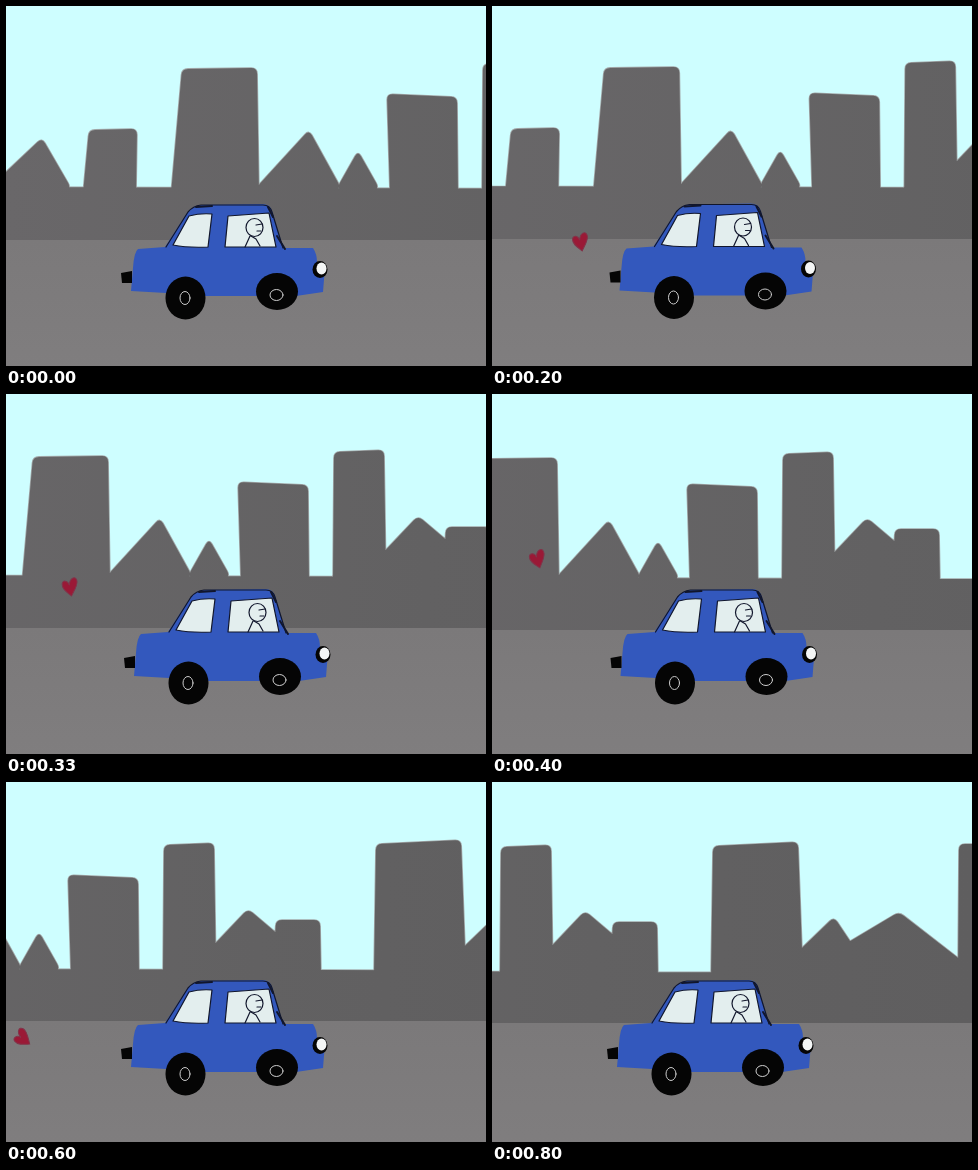
An HTML page that plays this animation: 480 by 360 pixels, repeating every 0.87 s.

```html
<!DOCTYPE html>
<html lang="en">
<head>
<meta charset="utf-8">
<title>Blue car in the city</title>
<style>
  html, body { margin: 0; width: 100%; height: 100%; overflow: hidden; background: #7f7d7e; }
  svg { display: block; width: 480px; height: 360px; }
</style>
</head>
<body>
<svg viewBox="0 0 480 360">
  <defs>
    <linearGradient id="paint" gradientUnits="userSpaceOnUse" x1="0" x2="950" y1="0" y2="0">
      <stop offset="0" stop-color="#696769"/>
      <stop offset=".6" stop-color="#626162"/>
      <stop offset="1" stop-color="#5f5e5f"/>
    </linearGradient>
    <linearGradient id="asphalt" x2="0" y2="1">
      <stop offset="0" stop-color="#7b797a"/>
      <stop offset="1" stop-color="#807e7f"/>
    </linearGradient>
    <path id="heart" d="M0 9C-4 5-9 1-8-4C-7-8-2-7-1-2C0-9 6-11 7-6C8-2 4 3 0 9Z"
      fill="#9a1936" stroke="#82344a"/>
  </defs>

  <rect width="480" height="360" fill="#cefeff"/>

  <g id="city">
    <path id="skyline" fill="url(#paint)" stroke="#a3a8a9" stroke-width="1.6" paint-order="stroke"/>
    <rect x="-9" y="234" width="980" height="140" fill="url(#asphalt)"/>
  </g>

  <g id="hearts"></g>

  <g id="car" stroke-linecap="round" stroke-linejoin="round">
    <path fill="#3358bd" d="M125 285L127 262Q128 246 132 243L159 241L181 207Q186 200 195 199L256 198
      Q264 198 266 205L277 242L307 242Q311 248 311 256L319 261L317 286L290 290L200 290L160 287Z"/>
    <g fill="none" stroke="#11162c" stroke-width="1.2">
      <path d="M160 241L182 206Q187 200 195 199L257 199Q264 199 266 206L277 242"/>
      <path stroke-width="2" d="M190 201L206 200M262 201L267 211M271 230L279 243"/>
      <path fill="#e3eeee" d="M167 239L183 210Q194 207 206 208L202 241Q182 242 167 239Z"/>
      <path fill="#e3eeee" d="M222 210L263 207L270 241L219 241Z"/>
      <ellipse cx="248.500" cy="221.500" rx="8.500" ry="9"/>
      <path d="M250 219L256 218M251 225L255 225M244 230L239 241M245 230L250 233L254 240"/>
    </g>
    <g fill="#050505">
      <path d="M115 267L126 265L126 277L116 277Z"/>
      <ellipse cx="179.500" cy="292" rx="20" ry="21.500"/>
      <ellipse cx="271" cy="285.500" rx="21" ry="18.500"/>
      <ellipse cx="314" cy="263.500" rx="7.500" ry="8.500"/>
    </g>
    <ellipse cx="315.500" cy="262.500" rx="5" ry="6" fill="#f4f6f6"/>
    <g fill="none" stroke="#ccc">
      <ellipse cx="179" cy="292" rx="5" ry="6.500"/>
      <ellipse cx="270.500" cy="289" rx="6.500" ry="5.500"/>
    </g>
  </g>
</svg>
<script>
const LOOP = 870, LAST_STEP = 12;
const byId = id => document.getElementById(id);

// Closed outline through points, each corner softened by r
function softPolygon(points, r = 6) {
  const toward = ([x, y], [u, v]) => {
    const k = r / Math.hypot(u - x, v - y);
    return [x + (u - x) * k, y + (v - y) * k];
  };
  const corners = points.map((p, i) => {
    const before = points.at(i - 1), after = points[(i + 1) % points.length];
    return `${toward(p, before)}Q${p} ${toward(p, after)}`;
  });
  return `M${corners.join('L')}Z`;
}

const tower = (footL, headL, headR, footR, topL, topR) =>
  softPolygon([[footL, 188], [headL, topL], [headR, topR], [footR, 188]]);
const peak = (left, top, right, y) =>
  softPolygon([[left, 182], [top, y], [right, 182], [top, 200]]);

byId('skyline').setAttribute('d', [
  'M-9 181L970 184V245H-9Z',
  peak(-17, 36, 65, 132),
  tower(77, 83, 131, 130, 124, 123),
  tower(165, 176, 251, 253, 63, 62),
  peak(250, 303, 335, 124),
  peak(331, 352, 373, 145),
  tower(384, 381, 451, 452, 88, 91),
  tower(476, 477, 527, 529, 58, 56),
  peak(504, 561, 632, 122),
  tower(586, 589, 633, 634, 133, 133),
  tower(687, 689, 774, 779, 57, 53),
  peak(754, 810, 846, 128),
  peak(776, 875, 951, 123),
  tower(934, 935, 990, 990, 55, 55)
].join(''));

// Key poses: step, x, y and, for hearts, tilt
const cityKeys = [[0, 0, 0], [2, 15.5, 0], [4, 112, -2], [6, 186, 2], [7, 262, 4], [9, 319, 5], [12, 468, 7]];
const carKeys = [[0, 0, 0], [2, 2.5, 2], [4, 2.5, -3], [6, 3.5, -3], [7, 0, 0]];
const heartKeys = [
  [[2, 95, 251, -15], [4, 83, 221, 0], [6, 46, 165, -12], [8, 0, 133, -60]],
  [[7, 91, 265, -75], [9, 17, 256, -48]]
];

// Straight blend between the neighbouring key poses
function poseAt(keys, step) {
  const next = keys.findIndex(([at]) => at >= step);
  if (next < 0) return keys.at(-1).slice(1);
  const to = keys[next], from = keys[Math.max(next - 1, 0)];
  const k = (step - from[0]) / (to[0] - from[0] || 1);
  return from.map((value, i) => value + (to[i] - value) * k).slice(1);
}

// The drawing changes 15 times a second, on whole hundredths
function stepAt(time) {
  let step = LAST_STEP;
  while (Math.round(step * 20 / 3) * 10 > time) step--;
  return step;
}

const place = (x, y, tilt = 0) => `translate(${x} ${y}) rotate(${tilt})`;

function draw(now) {
  const step = stepAt(now % LOOP);
  const [cityX, cityY] = poseAt(cityKeys, step);
  byId('city').setAttribute('transform', place(-cityX, cityY));
  byId('car').setAttribute('transform', place(...poseAt(carKeys, step)));
  byId('hearts').innerHTML = heartKeys
    .filter(keys => step >= keys[0][0] && step <= keys.at(-1)[0])
    .map(keys => `<use href="#heart" transform="${place(...poseAt(keys, step))}"/>`)
    .join('');
  requestAnimationFrame(draw);
}
draw(0);
</script>
</body>
</html>
```
